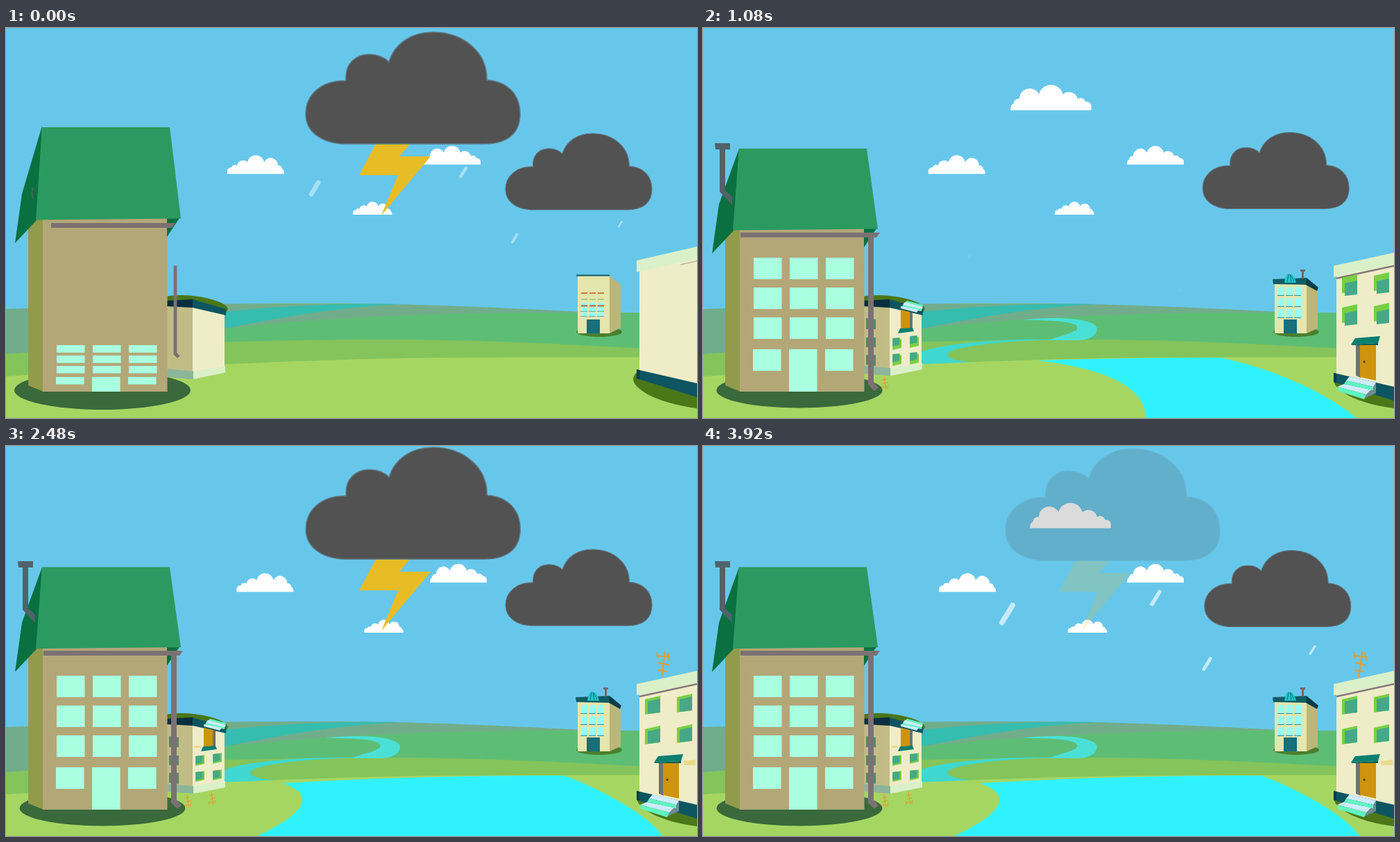
Recreate the animation shown at these times as an HTML page. Size 996x562 px, loop 3.96 s.

```html
<!DOCTYPE html>
<html lang="en">
<head>
<meta charset="utf-8">
<title>Stormy village</title>
<style>
html, body { margin: 0; width: 100%; height: 100%; overflow: hidden; background: #67c7eb; }
svg { display: block; width: 100vw; height: 100vh; }
</style>
</head>
<body>
<svg viewBox="0 0 996 562" preserveAspectRatio="none">
<defs>
  <path id="puff" fill="#fff" d="M0 27V22A5 5 0 0 1 6 18A5 5 0 0 1 14 15A9 9 0 0 1 29 10A12.2 12.2 0 0 1 53 10A10.5 10.5 0 0 1 73 15A5 5 0 0 1 79 20Q82 21 82 27Z"/>
  <path id="dark" fill="#525252" stroke="#5f7880" stroke-width="1.5" d="M484 167C455 165 432 150 432 124C432 96 455 75 490 76C488 50 505 38 524 38C535 38 545 42 552 49C560 22 585 6 615 6C663 6 694 38 693 75C723 77 741 96 741 124C741 152 722 167 690 167Z"/>
  <g id="win"><path id="frame" fill="#78cf45" d="M0 5L22 0V24L0 27Z"/><path fill="#46a887" d="M4 8L22 4V24L4 26Z"/></g>
  <path id="aerial" fill="none" stroke="#dda036" stroke-width="2.2" d="M0 0L5-37M-6-10L8-8M-5-21L11-17M-8-31L12-29M-7-36L-5-27M9-35L11-24"/>
  <path id="arch" fill="#97fff4" d="M0 12V5Q0 0 5 0H9V12Z"/>
  <clipPath id="riverClip"><rect id="riverMask" x="300" y="414" width="290" height="0"/></clipPath>
</defs>

<rect width="996" height="562" fill="#67c7eb"/>
<g id="puffs">
  <use href="#puff"/><use href="#puff"/><use href="#puff"/><use href="#puff"/>
</g>

<path fill="#72ad8b" d="M0 405C150 399 300 397 430 397C570 396 700 402 830 409L996 412V562H0Z"/>
<path fill="#35bdb0" d="M300 411C380 400 500 396 570 398C480 402 400 416 300 436Z"/>
<path fill="#5ebd75" d="M233 444C400 419 600 409 830 410L996 411V562H233Z"/>
<path fill="#84c45b" d="M0 470C180 455 380 449 540 449C680 449 800 455 996 466V562H0Z"/>
<g clip-path="url(#riverClip)">
  <path fill="#4be0d5" d="M460 421C500 415 568 417 568 434C567 444 555 450 540 450H497C520 442 544 438 539 430C533 422 500 421 460 421Z"/>
  <path fill="#3fd8d0" d="M510 449C410 447 330 458 312 468V488L395 482C352 480 342 470 362 464C395 455 440 451 510 449Z"/>
</g>
<path fill="#a6d662" d="M0 502C200 489 450 477 620 475L996 474V562H0Z"/>
<path id="lake" fill="#30f2ff"/>

<g id="rain" stroke="#fff" stroke-linecap="round"></g>

<g id="storm">
  <path fill="#e8bc25" d="M534 165H584L567 185H612L541 270L565 212H509Z"/>
  <use href="#dark"/>
</g>
<use href="#dark" id="storm2"/>

<!-- small house on the right -->
<ellipse cx="855" cy="438" rx="33" ry="7" fill="#4a7f2e"/>
<g id="hut">
  <path fill="#e4e6ae" d="M824 368H870V440H824Z"/>
  <path fill="#bab779" d="M870 368L886 379V433L870 440Z"/>
</g>
<path id="hutLine" stroke="#175c62" stroke-width="2" d="M822 356.5H870"/>
<g id="hutRoof">
  <path fill="#0f5e66" d="M821 362L870 360V370L822 369Z"/>
  <path fill="#093d49" d="M870 360L887 374L885 379L869 370Z"/>
  <path fill="#20c5cb" d="M838 367Q839 354 845 354Q852 354 855 367Z"/>
  <path stroke="#0d7780" fill="none" d="M842 366L844 355M848 366L846 355M852 365L847 356"/>
</g>
<path id="hutPipe" fill="#75666a" d="M861 348H868V351H866V361H863V351H861Z"/>
<g id="hutWins"></g>
<g id="hutMarks" stroke-width="1.5" stroke-dasharray="9 3">
  <path stroke="#c9552a" d="M829 382H863M829 400H863"/><path stroke="#9cc678" d="M829 391H863"/>
</g>
<path fill="#176f7a" d="M837 420H856V440H837Z"/>

<!-- large house on the right -->
<path id="blockShade" fill="#4b7719"/>
<g id="block">
  <path fill="#efecc8" d="M913 352L996 332V520L913 499Z"/>
  <path fill="#daf0c9" d="M909 343L996 324V341L909 359Z"/>
  <path id="blockLine" stroke="#837a7c" stroke-width="2.5" d="M913 361L996 343"/>
</g>
<g id="blockBase">
  <path fill="#0d5560" d="M909 497L996 517V537L909 510Z"/>
  <path fill="#083c49" d="M909 497L913 498V511L909 510Z"/>
</g>
<g id="blockWins">
  <use href="#win" x="921" y="360"/><use href="#win" x="967" y="357"/>
  <use href="#win" x="921" y="403"/><use href="#win" x="967" y="401"/>
</g>
<g id="blockDoor">
  <path fill="#6b7272" d="M941 456H948V504L941 501Z"/>
  <path fill="#ce940d" d="M947 456H970V508L947 503Z"/>
  <circle cx="953" cy="481" r="1.5" fill="#333"/>
  <path fill="#0b7f70" d="M940 447L976 444L973 454L934 456Z"/>
  <path fill="#075c58" d="M934 456L973 454V457H936Z"/>
  <path fill="#6e8c94" d="M970 511V526L953 534L956 526Z"/>
  <path fill="#cdebff" d="M932 502L970 511L966 517L927 508ZM924 513L963 521L956 528L914 517Z"/>
  <path fill="#5ff5c0" d="M927 508L966 517V522L924 513ZM914 517L956 528L953 535L915 523Z"/>
</g>
<path class="sign" fill="#e9dc8a" d="M977 454L994 452V460H977Z"/>
<use id="aerialR" href="#aerial" x="945" y="333"/>

<!-- upside-down house on the left -->
<path fill="#4b7719" d="M225 388C260 379 318 392 320 405L316 412H225Z"/>
<use id="aerialA" href="#aerial"/><use id="aerialB" href="#aerial"/>
<g id="flip">
  <path fill="#c1bc86" d="M230 400L269 402V494H230Z"/>
  <path fill="#efecc8" d="M269 402L315 411V486L269 493Z"/>
  <path fill="#8db59a" d="M232 487L270 490V501L232 498Z"/>
  <path fill="#daf0c9" d="M270 490L316 483V492L270 501Z"/>
</g>
<path fill="#082f40" d="M230 393L269 391V403L230 401Z"/>
<path fill="#0d5560" d="M269 391L317 405V414L269 403Z"/>
<g id="flipWins">
  <use href="#win" transform="translate(286 461) scale(-.58)"/><use href="#win" transform="translate(311 458) scale(-.58)"/>
  <use href="#win" transform="translate(286 484) scale(-.58)"/><use href="#win" transform="translate(311 482) scale(-.58)"/>
  <path fill="#588767" d="M235 418L249 420V434H235ZM235 446H249V460H235ZM235 471H249V487L235 485Z"/>
</g>
<g id="flipDoor">
  <path fill="#ce940d" d="M285 406L298 409V435H285Z"/>
  <path fill="#6b7272" d="M298 409L302 410V433H298Z"/>
  <path fill="#0b7f70" d="M284 433L302 432L304 437L281 440Z"/>
  <path fill="#5ff5c0" d="M285 403L294 393L317 399L315 408Z"/>
  <path fill="#cdebff" d="M291 395L317 402L315 405L288 399ZM285 401L311 406L308 410L285 404Z"/>
</g>
<path class="sign" fill="#e9dc8a" d="M272 432H281V435H272Z"/>

<!-- big house -->
<ellipse id="shade" cx="139" cy="522" fill="#3a693b"/>
<path id="side" fill="#929b4c"/>
<path id="front" fill="#b3a778"/>
<path id="eaves" fill="#0a7040"/>
<path id="roof" fill="#2b9a60"/>
<g id="panes" fill="#a9ffe0"></g>
<path id="gutter" fill="#7b7173" d="M54 295H255L250 302H54Z"/>
<path id="pipe" fill="#7b7173" d="M238 301H246V510L253 518L247 523L238 514Z"/>
<path id="chimney" fill="#50636a" d="M17 166H39V175H32V234L42 243V255L24 236V175H18Z"/>
</svg>
<script>
const LOOP = 3960, STEP = 40;
const $ = id => document.getElementById(id);
const set = (el, attrs) => { for (const k in attrs) el.setAttribute(k, attrs[k]); };
const clamp = v => Math.max(0, Math.min(1, v));
const ramp = (t, a, b) => clamp((t - a) / (b - a));
const mix = (a, b, p) => a + (b - a) * p;

// eases from a start size to 1 with a slight overshoot
function grow(t, a, b, from = 0) {
  const p = ramp(t, a, b) - 1;
  return t < a ? from : mix(from, 1, 1 + 2.7 * p ** 3 + 1.7 * p ** 2);
}
function scale(el, x, y, sx, sy) {
  set(el, { transform: `translate(${x} ${y}) scale(${sx} ${sy}) translate(${-x} ${-y})` });
}
const move = (el, x, y, rest = '') => set(el, { transform: `translate(${x} ${y}) ${rest}` });

// window grids
let panes = '', arches = '';
for (const y of [331, 374, 417, 463])
  for (const x of [73, 125, 177]) {
    const last = y === 463, door = last && x === 125;
    panes += `<rect x="${last ? x - 1 : x}" y="${y}" width="40.5" height="${door ? 61 : 31}"/>`;
  }
for (const y of [373, 389, 405])
  for (const x of [829, 841, 853])
    arches += `<use href="#arch" x="${x}" y="${y}"/><path d="M${x - 1} ${y + 12.5}h10" stroke="#348f93"/>`;
$('panes').innerHTML = panes;
$('hutWins').innerHTML = arches;

// rain comes in waves: peak within the cycle, then where its drops fall
const CYCLE = 1270;
const waves = [
  [70, [[441, 238], [729, 310], [655, 215], [881, 290]]],
  [600, [[614, 298], [647, 326], [780, 362], [851, 346]]],
  [850, [[398, 306], [701, 355]]]
];
const drops = waves.flatMap(([peak, spots]) => spots.map(([x, y]) => ({ peak, x, y })));
$('rain').innerHTML = '<line/>'.repeat(drops.length);

function drawRain(t) {
  drops.forEach(({ peak, x, y }, i) => {
    // time from the nearest peak; drops form quickly and fade slowly
    const gap = (t - peak + CYCLE * 1.5) % CYCLE - CYCLE / 2;
    const p = gap / (gap < 0 ? 120 : 240), q = Math.max(0, 1 - p * p);
    const w = 12 - x / 100, half = w * 2 * q;
    const cx = x - gap * .06, cy = y + gap * .1;
    set($('rain').children[i], {
      x1: cx + half * .52, y1: cy - half * .85, x2: cx - half * .52, y2: cy + half * .85,
      'stroke-width': w * mix(.5, 1, q), opacity: .65 * q
    });
  });
}

function drawHouse(t, d) {
  const top = 174.5 - 31.5 * d, low = 291.5 - 15.5 * d;
  set($('shade'), { rx: 119.5 + 7.5 * d, ry: 25.5 + 2.5 * d });
  set($('side'), { d: `M32 ${low - 12}H54V524L32 515Z` });
  set($('front'), { d: `M53 ${low - 12}H232.5V524H53Z` });
  set($('eaves'), { d: `M52 ${top - 2 * d}L23 ${low - 37}L13 ${low + 34}L45 ${low}ZM232 ${low - 2}H250L232 ${low + 25}Z` });
  set($('roof'), { d: `M52 ${top}H236L252 ${low - 1.5}L43 ${low + .5}Z` });
  scale($('panes'), 0, 524, 1, grow(t, 0, 680, .347));
  const g = mix(.89, 1, ramp(t, 0, 690)), p = grow(t, 0, 600, .6), c = grow(t, 0, 720, .18);
  set($('gutter'), { transform: `translate(${155 * (1 - g)} ${-14 * d}) scale(${g} 1)` });
  scale($('pipe'), 247, 405, p, p);
  scale($('chimney'), 40, 245, c, c);
}

function drawNeighbours(t, d) {
  scale($('hut'), 0, 440, 1, 1 + .15 * d);
  set($('hutLine'), { opacity: 1 - ramp(t, 40, 200) });
  set($('hutMarks'), { opacity: 1 - ramp(t, 80, 280) });
  scale($('hutRoof'), 0, 368, 1, grow(t, 0, 600));
  scale($('hutPipe'), 864, 361, 1, grow(t, 560, 1080));
  scale($('hutWins'), 0, 414, 1, grow(t, 0, 600, .45));

  scale($('block'), 0, 499, 1, 1 + .052 * d);
  set($('blockShade'), { d: `M996 ${500 - 4 * d}H${914 - 4 * d}C${896 - 8 * d} 512 930 540 996 548Z` });
  move($('blockBase'), 0, -5 * d);
  const line = mix(.29, 1, ramp(t, 0, 560)), wins = grow(t, 560, 1080), door = grow(t, 120, 600);
  scale($('blockLine'), 996, 344, line, line);
  scale($('blockWins'), 0, 434, 1, wins);
  scale($('flipWins'), 0, 444, 1, wins);
  move($('frame'), 0, -5 * (1 - ramp(t, 1080, 1400)));
  set($('frame'), { opacity: ramp(t, 600, 900) });
  scale($('blockDoor'), 955, 516, door, door);
  scale($('flipDoor'), 294, 404, door, door);
  scale($('flip'), 0, 400, 1, 1 + .05 * d);

  const late = grow(t, 1200, 1600);
  document.querySelectorAll('.sign').forEach(el => set(el, { opacity: clamp(late) }));
  scale($('aerialR'), 945, 333, 1, late);
  move($('aerialA'), 261, 502, `scale(.52 ${-.52 * grow(t, 820, 1080)})`);
  move($('aerialB'), 296, 498, `scale(.52 ${-.52 * late})`);
}

function drawSky(t) {
  const puffs = $('puffs').children;
  move(puffs[0], 319 + t * .0054, 183.2);
  move(puffs[1], 500 + t * .0066, 250.3, 'scale(.69)');
  move(puffs[2], 684 + 9 * ramp(t, 0, 520), 169.7, 'scale(-1 1)');
  move(puffs[3], 549 + t * .0099, 82, 'scale(-1.42 1.35)');

  // the clouds wobble between a few points
  const sway = [[0, 0, 0], [600, 2, -2.4], [1080, .3, -2], [1880, -.3, -.2], [2480, .2, -4], [3360, 1.4, -3.2], [3920, 4, -2]];
  const i = Math.max(1, sway.findIndex(s => s[0] >= t));
  const [a, ax, ay] = sway[i - 1], [b, bx, by] = sway[i];
  const p = .5 - Math.cos(Math.PI * ramp(t, a, b)) / 2;
  const x = mix(ax, bx, p), y = mix(ay, by, p);
  move($('storm'), x, y);
  set($('storm'), { opacity: 1 - ramp(t, 800, 1070) + ramp(t, 1350, 1600) - ramp(t, 3680, 3980) });
  move($('storm2'), 424.9 + x * .7, 147.9 + y * .75, 'scale(.683)');
}

function drawWater(t) {
  set($('riverMask'), { height: 74 * ramp(t, 40, 480) });
  // r floods down the meadow, s then widens the left bank
  const r = ramp(t, 340, 1080), s = ramp(t, 1080, 1600);
  const y = 478 + 84 * Math.sqrt(r), x = 776 - 138 * r - 276 * s;
  const left = `${480 - 81 * s} ${479 + 7 * s}`;
  set($('lake'), {
    d: `M${left}Q${620 - 40 * s} 475 ${735 + 10 * r + 60 * s} 475` +
      `C${840 + 20 * s} ${485 + 10 * r} ${870 + 40 * r + 20 * s} ${490 + 45 * r} ${920 + 22 * r + 4 * s} ${y}` +
      `H${x}C${x + 62 * (1 - r) + 58 * s} ${y - 17 - 35 * r + 25 * s} ${740 - 180 * r - 105 * s} ${484 + 4 * r + 17 * s} ${left}Z`,
    opacity: ramp(t, 300, 380)
  });
}

function draw(ms) {
  const t = Math.floor(ms % LOOP / STEP) * STEP;
  const d = Math.exp(-3.3 * t / 1000) * Math.cos(2 * Math.PI * t / 1000); // damped bounce
  drawSky(t);
  drawRain(t);
  drawWater(t);
  drawNeighbours(t, d);
  drawHouse(t, d);
}

const start = performance.now();
function tick() {
  draw(performance.now() - start);
  requestAnimationFrame(tick);
}
tick();
</script>
</body>
</html>
```
